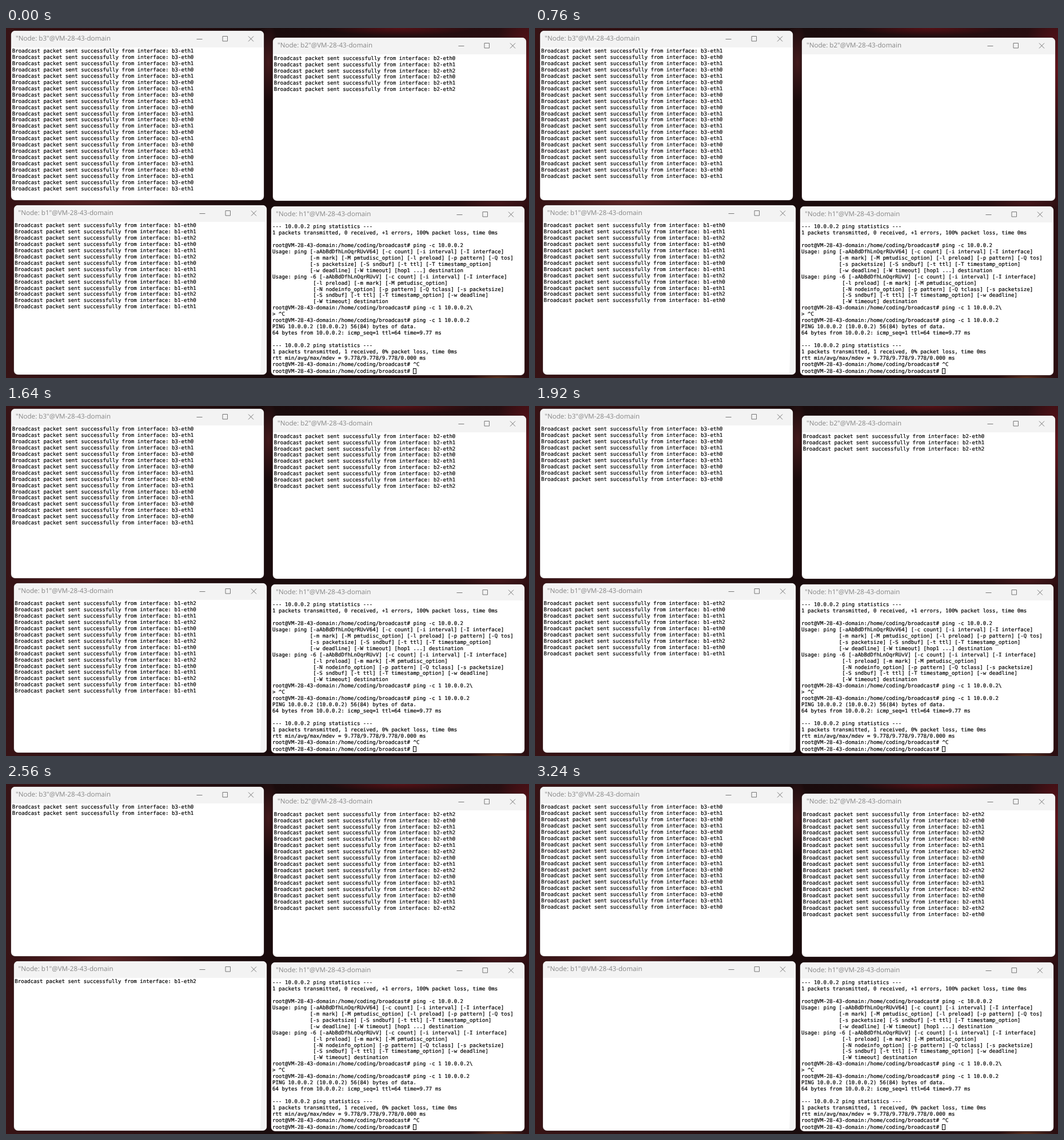
An HTML page that plays this animation: 915 by 612 pixels, repeating every 3280 ms.

```html
<!DOCTYPE html>
<html lang="en">
<head>
<meta charset="utf-8">
<title>Broadcast terminals</title>
<style>
  html, body { margin: 0; width: 100%; height: 100%; overflow: hidden; }
  body {
    position: relative;
    background:
      radial-gradient(ellipse 150px 16px at 165px 305px, #5e2526, transparent),
      radial-gradient(ellipse 60px 130px at 915px 70px, #62131a, transparent),
      radial-gradient(ellipse 130px 14px at 690px 0, #561015, transparent),
      radial-gradient(ellipse 70px 12px at 860px 306px, #431519, transparent),
      radial-gradient(ellipse 20px 70px at 459px 60px, #431a1c, transparent),
      radial-gradient(ellipse 50px 6px at 860px 611px, #59301f, transparent),
      linear-gradient(90deg, #371315 0, #2c1012 260px, #190b0c 440px, #210d0f 700px, #2b0e11 100%);
  }
  .win {
    position: absolute;
    overflow: hidden;
    border-radius: 7px;
    background: #fff;
    box-shadow: 0 0 0 .6px #57494a;
  }
  .bar { height: 28.5px; background: #f3f3f3; }
  .bar span {
    position: absolute; left: 8px; top: 4px;
    font: 11.65px/20px "Open Sans", "Noto Sans", sans-serif;
    color: #858585;
    white-space: pre;
    text-rendering: geometricPrecision;
  }
  .bar svg {
    position: absolute; left: 320px; top: 8px;
    fill: none; stroke: #777; stroke-width: 1;
  }
  pre {
    position: absolute; left: 1.8px; margin: 0;
    font: 9.1px/10.95px "DejaVu Sans Mono", "Liberation Mono", monospace;
    color: #000;
    -webkit-text-stroke: .2px #000;
    text-rendering: geometricPrecision;
    font-variant-ligatures: none;
  }
  .edge {
    position: absolute; right: 0; top: 28px; bottom: 0; width: 11px;
    background: #f4f4f4;
    clip-path: polygon(72% 0, 100% 0, 100% 100%, 0 100%);
  }
  .cursor {
    display: inline-block; box-sizing: border-box;
    width: 5.6px; height: 10px;
    border: 1px solid #000;
    vertical-align: -2px;
  }
</style>
</head>
<body>
<script>
const HOST = "VM-28-43-domain";
const LOOP = 3280, STEP = 40, ROWS = 24;
const PROMPT = `root@${HOST}:/home/coding/broadcast# `;

function makeWindow(node, x, y, w, h, textTop) {
  const win = document.createElement("div");
  win.className = "win";
  win.style.cssText = `left:${x}px;top:${y}px;width:${w}px;height:${h}px`;
  win.innerHTML = `<div class="bar"><span>"Node: ${node}"@${HOST}</span>
    <svg width="110" height="12">
      <path d="M4.5 6.5h10M50 1.5h8.5v8.5h-8.5zM95 1.5l9 9m0-9l-9 9"/>
    </svg></div>`;
  const pre = document.createElement("pre");
  pre.style.top = textTop + "px";
  win.append(pre);
  document.body.append(win);
  return pre;
}

// Output position runs along these keys; a page holds ROWS lines.
const times = [0, 760, 1280, 1640, 2200, 2560, 3240];
const nodes = [
  { name: "b3", ports: 2, box: [9, 5, 442, 295.5, 31],
    pos: [23, 21, 21, 16, 2, 2, -7], first: [1, 1, 1, 0, 0, 0, 0] },
  { name: "b2", ports: 3, box: [467, 17.3, 442.5, 285, 31.3],
    pos: [6, 0, -6, -15, -28, -32, -31], first: [0, 0, 0, 0, 2, 2, 2] },
  { name: "b1", ports: 3, box: [13.5, 310, 442.5, 295.5, 31],
    pos: [14, 13, 15, 15, 2, 1, 0], first: [0, 0, 2, 2, 2, 2, 2] }
];
for (const n of nodes) n.pre = makeWindow(n.name, ...n.box);

const edge = document.createElement("div");
edge.className = "edge";
nodes[2].pre.before(edge);

const pad = " ".repeat(12), pad6 = pad + " ";
const shell = makeWindow("h1", 464.3, 311.5, 442.5, 295.5, 31.5);
shell.textContent = [
  "--- 10.0.0.2 ping statistics ---",
  "1 packets transmitted, 0 received, +1 errors, 100% packet loss, time 0ms",
  "",
  PROMPT + "ping -c 10.0.0.2",
  "Usage: ping [-aAbBdDfhLnOqrRUvV64] [-c count] [-i interval] [-I interface]",
  pad + "[-m mark] [-M pmtudisc_option] [-l preload] [-p pattern] [-Q tos]",
  pad + "[-s packetsize] [-S sndbuf] [-t ttl] [-T timestamp_option]",
  pad + "[-w deadline] [-W timeout] [hop1 ...] destination",
  "Usage: ping -6 [-aAbBdDfhLnOqrRUvV] [-c count] [-i interval] [-I interface]",
  pad6 + "[-l preload] [-m mark] [-M pmtudisc_option]",
  pad6 + "[-N nodeinfo_option] [-p pattern] [-Q tclass] [-s packetsize]",
  pad6 + "[-S sndbuf] [-t ttl] [-T timestamp_option] [-w deadline]",
  pad6 + "[-W timeout] destination",
  PROMPT + "ping -c 1 10.0.0.2\\",
  "> ^C",
  PROMPT + "ping -c 1 10.0.0.2",
  "PING 10.0.0.2 (10.0.0.2) 56(84) bytes of data.",
  "64 bytes from 10.0.0.2: icmp_seq=1 ttl=64 time=9.77 ms",
  "",
  "--- 10.0.0.2 ping statistics ---",
  "1 packets transmitted, 1 received, 0% packet loss, time 0ms",
  "rtt min/avg/max/mdev = 9.778/9.778/9.778/0.000 ms",
  PROMPT + "^C",
  PROMPT
].join("\n");
const cursor = document.createElement("span");
cursor.className = "cursor";
shell.append(cursor);

function render(t) {
  let k = times.length - 1;
  while (times[k] > t) k--;
  const next = Math.min(k + 1, times.length - 1);
  const f = next === k ? 0 : (t - times[k]) / (times[next] - times[k]);
  for (const n of nodes) {
    const pos = Math.round(n.pos[k] + (n.pos[next] - n.pos[k]) * f);
    const count = (pos % ROWS + ROWS) % ROWS;
    n.pre.textContent = Array.from({ length: count }, (_, i) =>
      `Broadcast packet sent successfully from interface: ${n.name}-eth${(n.first[k] + i) % n.ports}`
    ).join("\n");
  }
}

const start = performance.now();
let shown = -1;
function tick() {
  const t = Math.floor(((performance.now() - start) % LOOP) / STEP) * STEP;
  if (t !== shown) render(shown = t);
  requestAnimationFrame(tick);
}
tick();
</script>
</body>
</html>
```
